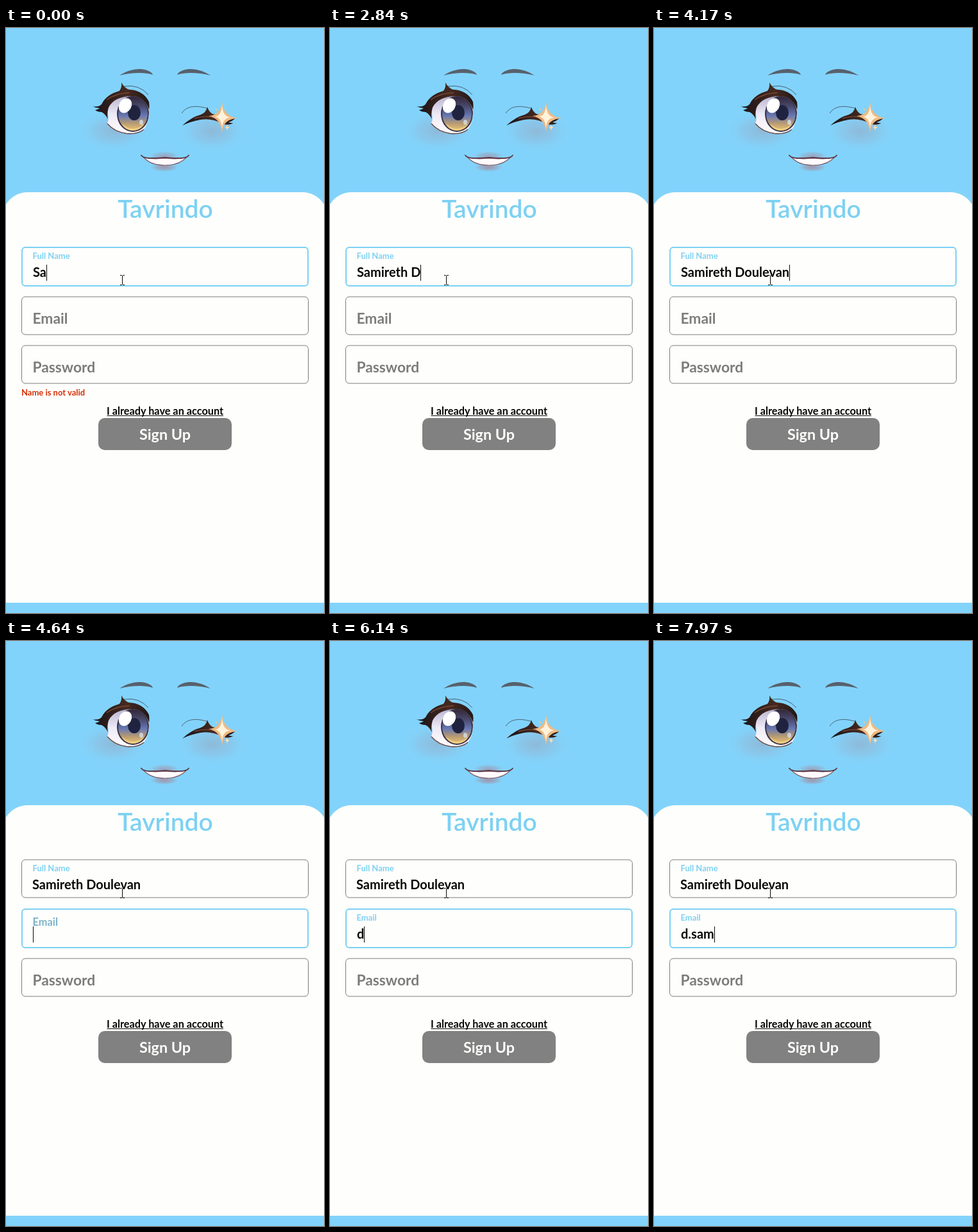
An HTML page that plays this animation: 496 px wide and 912 px high, repeating every 8 s.

```html
<!DOCTYPE html>
<html lang="en">
<head>
<meta charset="utf-8">
<title>Sign up</title>
<style>
  html, body { margin: 0; width: 100%; height: 100%; overflow: hidden; background: #82d3fb; }
  svg { display: block; width: 496px; height: 912px; }
  text { font-family: Lato, "Open Sans", sans-serif; font-weight: 700; white-space: pre; }
  .mid { text-anchor: middle; }
  .field rect { fill: none; }
  .value { font-size: 20px; fill: #070707; }
</style>
</head>
<body>
<svg viewBox="0 0 496 912">
  <defs>
    <radialGradient id="blush">
      <stop offset="0" stop-color="#90b5d2" stop-opacity=".85"/>
      <stop offset=".5" stop-color="#8dc0e2" stop-opacity=".6"/>
      <stop offset="1" stop-color="#82d3fb" stop-opacity="0"/>
    </radialGradient>
    <radialGradient id="lip">
      <stop offset="0" stop-color="#a58fa6" stop-opacity=".95"/>
      <stop offset=".55" stop-color="#96a5bd" stop-opacity=".65"/>
      <stop offset="1" stop-color="#82d3fb" stop-opacity="0"/>
    </radialGradient>
    <radialGradient id="glow">
      <stop offset="0" stop-color="#f5cf9a" stop-opacity=".7"/>
      <stop offset="1" stop-color="#e0a878" stop-opacity="0"/>
    </radialGradient>
    <linearGradient id="iris" x2="0" y2="1">
      <stop offset="0" stop-color="#33293c"/>
      <stop offset=".28" stop-color="#4a4a6c"/>
      <stop offset=".55" stop-color="#6678b4"/>
      <stop offset=".78" stop-color="#b79a72"/>
      <stop offset="1" stop-color="#edc573"/>
    </linearGradient>
    <linearGradient id="white" x2="0" y2="1">
      <stop offset="0" stop-color="#b9b4d0"/>
      <stop offset=".5" stop-color="#eeeaf6"/>
      <stop offset="1" stop-color="#fffcfd"/>
    </linearGradient>
    <linearGradient id="lash" x2="1" y2="0">
      <stop offset="0" stop-color="#191418"/>
      <stop offset=".6" stop-color="#46291f"/>
      <stop offset="1" stop-color="#221818"/>
    </linearGradient>
    <clipPath id="eye"><path id="eyeShape" d="M157 126C163 111 184 103 203 106Q221 109 223 126Q224 148 214 159Q203 166 186 164Q166 160 158 149Q162 139 157 126Z"/></clipPath>
    <path id="brow" d="M177 74C189 66 206 61 220 66Q228 69 229 73C214 68 194 70 177 74Z"/>
  </defs>

  <rect width="496" height="912" fill="#82d3fb"/>

  <g id="face">
    <ellipse cx="168" cy="160" rx="58" ry="33" fill="url(#blush)"/>
    <ellipse cx="322" cy="161" rx="56" ry="33" fill="url(#blush)"/>
    <g fill="#57616c">
      <use href="#brow"/>
      <use href="#brow" transform="matrix(-1 0 0 1 496 0)"/>
    </g>

    <use href="#eyeShape" fill="url(#white)"/>
    <g clip-path="url(#eye)">
      <ellipse cx="198" cy="134" rx="25" ry="28" fill="#383248"/>
      <ellipse cx="198" cy="134" rx="23" ry="26" fill="url(#iris)"/>
      <ellipse cx="200" cy="132" rx="10" ry="12" fill="#20233f"/>
      <path d="M181 149Q198 165 215 149Q210 160 198 160Q186 160 181 149Z" fill="#f4d588" opacity=".7"/>
      <path d="M157 126C165 108 190 102 223 114V100H150Z" fill="#33283a" opacity=".35"/>
      <ellipse cx="186" cy="121" rx="9.5" ry="12" transform="rotate(30 186 121)" fill="#fff"/>
      <ellipse cx="211" cy="147" rx="3" ry="4" fill="#dfe8f5" opacity=".7"/>
    </g>
    <path d="M158 149Q169 162 188 164.500Q206 166 215 158" fill="none" stroke="#6b4a48" stroke-width="1.4"/>
    <path fill="url(#lash)" d="M135 122Q144 124 149 119Q156 104 177 98Q181 93 180 85Q185 94 192 96Q214 97 223 115Q224 123 223 127Q217 110 202 106.500C184 104 166 111 160 124Q157 134 159 142Q155 134 149 131Q143 131 139 128Q144 127 146 125Q140 125 135 122Z"/>
    <path d="M157 112Q172 101 193 101" fill="none" stroke="#85503a" stroke-width="1.3" opacity=".8"/>
    <path d="M184 91Q207 87 222 104" fill="none" stroke="#466277" stroke-width="1"/>

    <path d="M274 133Q284 117 313 125" fill="none" stroke="#4b6575" stroke-width="1"/>
    <path fill="url(#lash)" d="M275 152Q289 139 304 135Q312 132 314 123Q316 130 322 134Q334 136 344 141Q351 143 358 140Q354 145 347 147Q353 149 355 148Q346 153 337 149Q321 140 303 143Q287 146 275 152Z"/>
    <path d="M294 141Q315 134 337 144" fill="none" stroke="#85503a" stroke-width="1.4" opacity=".8"/>
    <circle cx="337" cy="138" r="12" fill="url(#glow)"/>
    <path d="M337 113Q337.500 137 362 141Q338 141 337 164Q335.500 141 316 137Q335.500 136 337 113Z" fill="#eebb85"/>
    <path d="M337 119Q337.500 138 350 139.500Q337.500 140 337 157Q336 140 326 138Q336.500 137 337 119Z" fill="#fff3dc"/>
    <path d="M345 150Q345.500 154.500 349 155Q345.500 155.500 345 160Q344.500 155.500 341 155Q344.500 154.500 345 150Z" fill="#fbdcae"/>
    <circle cx="328" cy="127" r="1.3" fill="#f0c79a"/>

    <ellipse cx="247" cy="200" rx="27" ry="9" fill="url(#lip)" opacity=".75"/>
    <ellipse cx="247" cy="217" rx="25" ry="8" fill="url(#lip)"/>
    <path d="M215 202Q228 205 248 203Q268 205 281 202Q270 214 248 214Q226 214 215 202Z" fill="#fffafb" stroke="#80606c" stroke-width="1.2"/>
    <path d="M211 198.500Q214 203 225 203Q238 203 248 202Q258 203 271 203Q282 203 285 198.500" fill="none" stroke="#5f3a48" stroke-width="1.8" stroke-linecap="round"/>
  </g>

  <path d="M0 896V275A40 40 0 0 1 34 256H462A40 40 0 0 1 496 275V896Z" fill="#fefefc"/>
  <text class="mid" x="248.500" y="296" font-size="39" font-weight="600" fill="#7dd1f3" style="font-weight:600">Tavrindo</text>

  <g id="form"></g>

  <text id="error" x="24" y="572.500" font-size="13" fill="#d62f06">Name is not valid</text>
  <text class="mid" x="248" y="602.500" font-size="16.300" fill="#070707">I already have an account</text>
  <path d="M157.500 604.500H339" stroke="#070707"/>
  <rect x="144" y="608" width="208" height="50" rx="10" fill="#818181"/>
  <text class="mid" x="248" y="642" font-size="23.400" fill="#fefefc">Sign Up</text>

  <rect id="caret" width="1" height="25" fill="#070707"/>
  <path d="M178 385.500H180.500L181.500 386.500L182.500 385.500H185M181.500 386V400M178 400.500H180.500L181.500 399.500L182.500 400.500H185" fill="none" stroke="#070707"/>
</svg>
<script>
const LOOP = 8000, BLINK = 500, FLOAT = 200, SWITCH = 4520;
const SKY = [125, 209, 243], GRAY = [124, 124, 122];

// Each key time reveals one more character.
const NAME = {
  text: 'Samireth Doulevan',
  keys: [-300, -100, 300, 700, 1140, 1240, 1400, 1800, 2450, 2740,
         3100, 3240, 3400, 3560, 3700, 3840, 3970]
};
const MAIL = { text: 'd.sam', keys: [5900, 6400, 7300, 7550, 7800] };

const form = document.getElementById('form');
const caret = document.getElementById('caret');
const error = document.getElementById('error');

const mix = (a, b, p) => a + (b - a) * p;
const rgb = (a, b = a, p = 0) => `rgb(${a.map((v, i) => Math.round(mix(v, b[i], p)))})`;
const ease = p => p * p * (3 - 2 * p);

function set(el, attrs) {
  for (const key in attrs) el.setAttribute(key, attrs[key]);
}

function add(tag, parent, attrs = {}) {
  const el = document.createElementNS('http://www.w3.org/2000/svg', tag);
  set(el, attrs);
  return parent.appendChild(el);
}

function makeField(title) {
  const group = add('g', form, { class: 'field' });
  const box = add('rect', group);
  const label = add('text', group, { x: 41.5 });
  const value = add('text', group, { class: 'value' });
  label.textContent = title;
  return { box, label, value };
}

const fields = ['Full Name', 'Email', 'Password'].map(makeField);

function drawField(field, top, focused, lift, text) {
  const line = focused ? 2 : 1;
  set(field.box, {
    x: 24 + line / 2, y: top + line / 2,
    width: 448 - line, height: 58 + line, rx: 6 - line / 2,
    stroke: rgb(focused ? SKY : GRAY), 'stroke-width': line
  });
  set(field.label, {
    y: top + mix(42, 18.5, lift),
    'font-size': mix(22.8, 13, lift),
    fill: rgb(GRAY, SKY, lift)
  });
  set(field.value, { x: 40 + line, y: top + 45 + line });
  if (field.value.textContent !== text) field.value.textContent = text;
}

function typed({ text, keys }, t) {
  return text.slice(0, keys.filter(k => k <= t).length);
}

function render(t) {
  const onMail = t >= SWITCH;
  const lift = ease(Math.min(1, Math.max(0, (t - SWITCH) / FLOAT)));
  const mailTop = onMail ? 417 : 418.5;

  drawField(fields[0], onMail ? 340.5 : 341, !onMail, 1, typed(NAME, t));
  drawField(fields[1], mailTop, onMail, lift, typed(MAIL, t));
  drawField(fields[2], 494.5, false, 0, '');

  const times = [...NAME.keys, SWITCH, ...MAIL.keys].filter(k => k <= t);
  const since = t - times[times.length - 1];
  const active = fields[onMail ? 1 : 0].value;
  set(caret, {
    x: Math.round(42 + active.getComputedTextLength()),
    y: (onMail ? mailTop : 341) + 28,
    visibility: since % (2 * BLINK) < BLINK ? 'visible' : 'hidden'
  });
  set(error, { visibility: t < 300 ? 'visible' : 'hidden' });
}

const start = performance.now();
function tick() {
  render((performance.now() - start) % LOOP);
  requestAnimationFrame(tick);
}
tick();
</script>
</body>
</html>
```
